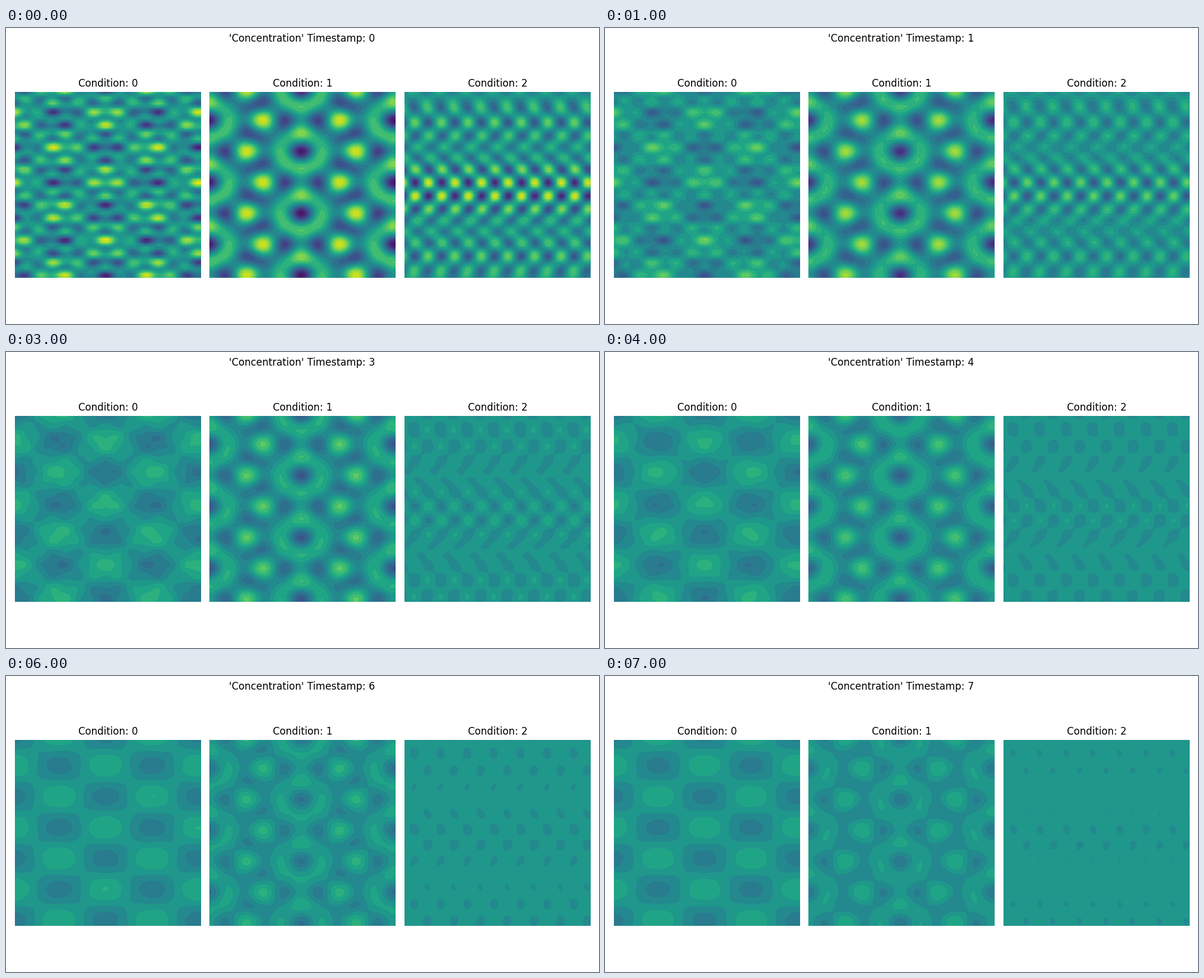
Write a matplotlib script that moves like this. It is 1000 px wide and 500 px high and loops after 8 s.

```python
from math import pi

import numpy as np
import matplotlib.pyplot as plt
from matplotlib.animation import FuncAnimation

W, H, DPI = 1000, 500, 100
SIDE, TOP, MARGIN = 313.9, 107.6, 15
GRID = 64
STEPS = 8
PEAK = 0.48                 # all waves of a condition in phase reach this
REST = 0.5075               # level every field relaxes to
DIFFUSION = 0.0056          # decay per step for each squared wave number
LEVELS = np.linspace(0, 1, 19)

# Wave numbers (kx, ky), centre in pixels, and phases as a rule of ky
CONDITIONS = (
    ([(2, 3), (7, 8), (2, 13)], (11, 262), lambda ky: (0, 1.1 / ky)),
    ([(5, 3), (2, 6)], (498, 211), lambda ky: (pi, 0.4 * (ky / 3 - 1))),
    ([(7, 5), (7, 7), (7, 8)], (690, 272.5),
     lambda ky: (0.2 * (20 / 3 - ky), -pi / 2)),
)


def concentration(condition, x, y, step):
    """Superpose equal standing waves, each damped by diffusion."""
    waves, (cx, cy), phases = condition
    u, v = 2 * pi * (x - cx) / SIDE, 2 * pi * (y - cy) / SIDE
    field = np.full(x.shape, REST)
    for kx, ky in waves:
        px, py = phases(ky)
        decay = np.exp(-DIFFUSION * (kx**2 + ky**2) * step)
        field += (PEAK / len(waves) * decay
                  * np.cos(kx * u + px) * np.cos(ky * v + py))
    return np.clip(field, 0.001, 0.999)


plt.rcParams["font.family"] = "DejaVu Sans"
fig = plt.figure(figsize=(W / DPI, H / DPI), dpi=DPI, facecolor="white")
heading = fig.suptitle("", fontsize=12, x=0.499, y=0.982)

panels = []
for number, left in enumerate(np.linspace(MARGIN, W - MARGIN + 0.8 - SIDE, 3)):
    ax = fig.add_axes([left / W, 1 - (TOP + SIDE) / H, SIDE / W, SIDE / H])
    ax.set(xlim=(left, left + SIDE), ylim=(TOP + SIDE, TOP))
    ax.autoscale(False)
    ax.set_axis_off()
    ax.set_title(f"Condition: {number}", fontsize=12)
    panels.append((ax, *np.meshgrid(np.linspace(left, left + SIDE, GRID),
                                    np.linspace(TOP, TOP + SIDE, GRID))))

contours = []


def draw(step):
    while contours:
        contours.pop().remove()
    heading.set_text(f"'Concentration' Timestamp: {step}")
    for (ax, x, y), condition in zip(panels, CONDITIONS):
        contours.append(ax.contourf(
            x, y, concentration(condition, x, y, step),
            levels=LEVELS, cmap="viridis", vmin=0, vmax=1))
    return [heading]


anim = FuncAnimation(fig, draw, frames=STEPS, init_func=lambda: draw(0),
                     interval=1000, repeat=True, repeat_delay=0, blit=False)
plt.show()
```
